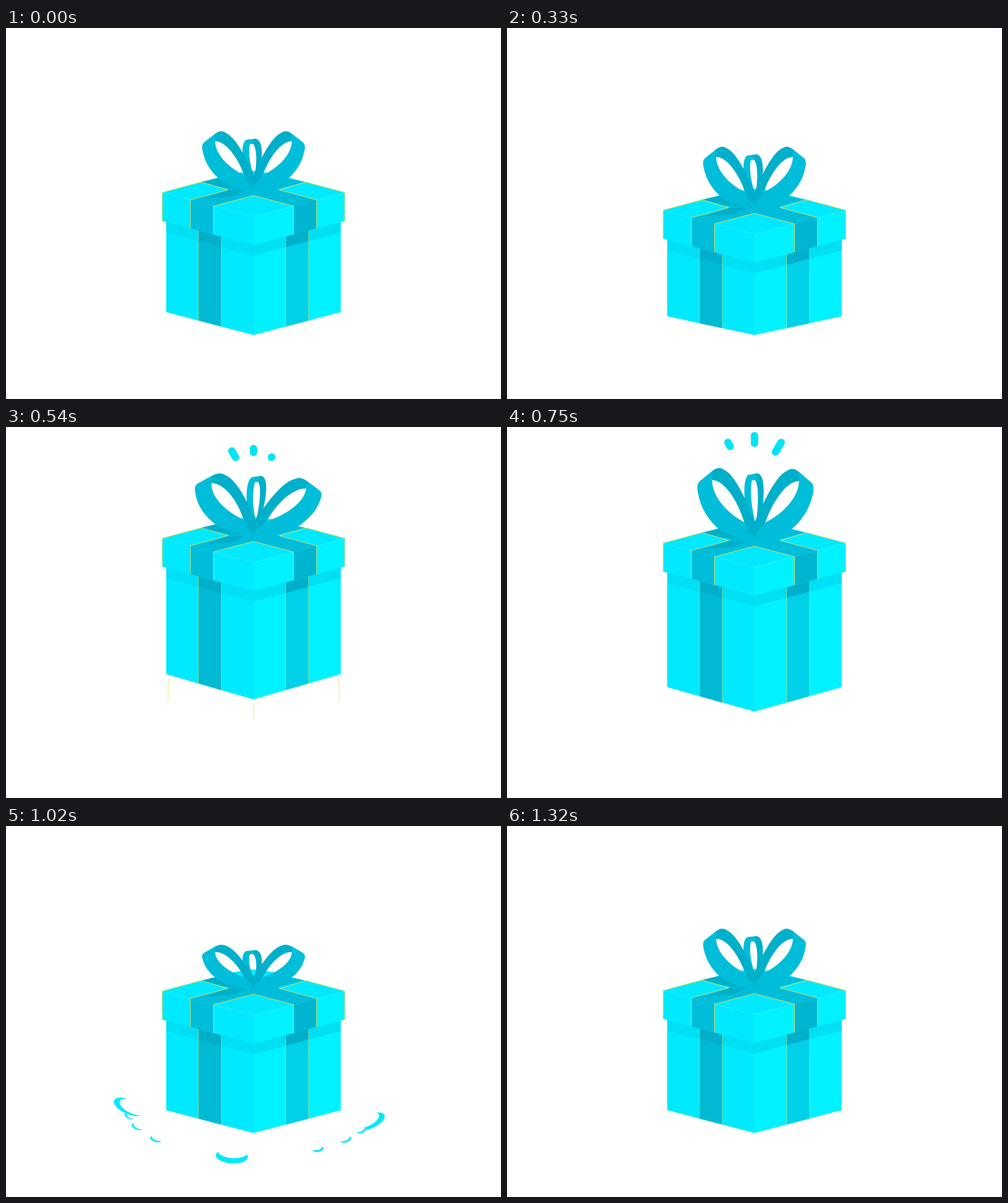
Animation, 800 px wide and 600 px high, one loop 1350 ms. Source, as an HTML page with a canvas:

```html
<!DOCTYPE html>
<html>
<head>
<meta charset="utf-8">
<title>Gift box</title>
<style>
  html, body { margin: 0; width: 100%; height: 100%; overflow: hidden; background: #fff; }
  canvas { display: block; width: 800px; height: 600px; }
</style>
</head>
<body>
<canvas id="stage" width="800" height="600"></canvas>
<script>
const ctx = document.getElementById('stage').getContext('2d');
const { PI, sin, cos, exp, abs, sqrt, sign } = Math;

const LOOP = 1350, STEP = 30;
const TAKEOFF = 379, LANDING = 863;
const GRAVITY = 0.00204;

const C = {
  face: '#00e9ff', bright: '#00f2ff', shade: '#00dff3',
  ribbon: '#00bdd9', ribbonBody: '#00bad4', ribbonLid: '#00b5cf', ribbonRight: '#00d1e8',
  dark: '#00afca', edge: '#dcdc58', dust: '#00e9fa', tick: '#00e4f4', trail: '#fdeebc'
};

const clamp = (v, a = 0, b = 1) => Math.max(a, Math.min(b, v));
const mix = (a, b, u) => a + (b - a) * u;
const smooth = u => u * u * (3 - 2 * u);
const arc = (t, peak, height) => GRAVITY * (t - peak) ** 2 - height;

// Crouch, ballistic flight, then a damped bounce.
function lidOffset(t) {
  if (t < TAKEOFF) return 30 * smooth(t / TAKEOFF);
  if (t < LANDING) return arc(t, 636, 104.8);
  const s = t - LANDING;
  return 51 * exp(-s / 60) * sin(PI * s / 170);
}

function bowPose(t) {
  if (t < TAKEOFF) {
    const tall = 1 + 0.1 * sin(PI * t / TAKEOFF);
    return { wide: 1, tall, mid: tall, sway: 0 };
  }
  if (t < LANDING) {
    const u = (t - TAKEOFF) / (LANDING - TAKEOFF), hump = sin(PI * u);
    const flare = hump * (1 - u / 2), tall = 1 + 0.76 * u ** 3 * hump;
    return { wide: 1 + 0.32 * flare, tall, mid: tall + 0.2 * flare, sway: flare * (1 - u) };
  }
  const s = t - LANDING, tall = 1 - 0.64 * exp(-s / 200) * sin(PI * s / 235);
  return { wide: 1, tall, mid: tall, sway: 0 };
}

function poly(color, ...pts) {
  ctx.fillStyle = color;
  ctx.beginPath();
  for (let i = 0; i < pts.length; i += 2) ctx.lineTo(pts[i], pts[i + 1]);
  ctx.fill();
}

function line(color, width, ...pts) {
  ctx.strokeStyle = color;
  ctx.lineWidth = width;
  ctx.beginPath();
  for (let i = 0; i < pts.length; i += 2) ctx.lineTo(pts[i], pts[i + 1]);
  ctx.stroke();
}

function shape(color, d) {
  ctx.fillStyle = color;
  ctx.fill(new Path2D(d));
}

function oval(color, x, y, rx, ry, rot) {
  ctx.fillStyle = color;
  ctx.beginPath();
  ctx.ellipse(x, y, rx, ry, rot, 0, 2 * PI);
  ctx.fill();
}

// Draws the left half, then its mirror image.
function mirrored(draw) {
  for (const side of [1, -1]) {
    ctx.save();
    ctx.translate(400, 0);
    ctx.scale(side, 1);
    ctx.translate(-400, 0);
    draw(side === 1);
    ctx.restore();
  }
}

function body(t, lid) {
  const lift = Math.max(0, -arc(t, 622, 69.6));
  const front = 496.5 - lift;
  const drop = 37 - 0.24 * Math.max(0, lid) + 0.07 * lift;
  const top = x => 351 + lid - (400 - x) * 0.2635;
  const low = x => front - (400 - x) / 141 * drop;
  const wall = (color, a, b) => poly(color, a, top(a) - 6, b, top(b) - 6, b, low(b), a, low(a));
  const shadow = (color, a, b) => poly(color, a, top(a) - 6, b, top(b) - 6, b, top(b) + 17, a, top(a) + 17);
  mirrored(left => {
    wall(left ? C.face : C.bright, 259, 400);
    shadow(C.shade, 259, 400);
    wall(left ? C.ribbonBody : C.ribbonRight, 311, 348);
    shadow(C.dark, 311, 348);
    ctx.globalAlpha = 0.6;
    for (const x of [311, 348]) line(C.edge, 1, x, top(x), x, low(x));
    ctx.globalAlpha = 1;
  });
}

function lidBox() {
  poly(C.face, 252, 266, 370, 235, 400, 231, 430, 235, 548, 266, 400, 305);
  mirrored(left => poly(left ? C.face : C.bright, 252, 266, 400, 305, 400, 351, 252, 312));
  mirrored(left => {
    poly(C.ribbon, 298, 278, 440, 240, 483, 249, 335, 288);
    poly(left ? C.ribbon : C.ribbonLid, 298, 278, 335, 288, 335, 334, 298, 324);
  });
  poly(C.dark, 315, 249, 366, 237, 392, 250, 388, 262, 350, 258);
  poly(C.dark, 324, 275, 358, 262, 388, 262, 364, 273);
  mirrored(() => {
    line(C.edge, 1, 298, 324, 298, 278, 358, 262, 315, 249, 252.5, 266, 252.5, 312);
    line(C.edge, 1, 335.5, 334, 335.5, 288, 400, 271);
  });
}

function sideLoop() {
  shape(C.dark, 'M336 173C343 166 350 166 354 169C370 175 386 206 402 242L402 262L385 238C374 208 355 183 338 183Z');
  shape(C.ribbon, 'M338 171L320 185Q315 189 318 200C322 220 334 237 352 250L400 268L400 256L385 238C356 224 338 202 338 183Z');
}

function middleLoop() {
  shape(C.dark, 'M388 181L403 179C418 181 415 218 407 246L401 246C405 225 407 196 399 187L393 188Z');
  shape(C.ribbon, 'M388 181C379 187 380 218 395 246L403 246C394 222 391 202 394 188Q396 186 399 188L401 180Z');
}

function bow({ wide, tall, mid, sway }) {
  const place = (w, h, tilt, flip, draw) => {
    ctx.save();
    ctx.translate(400, 262);
    ctx.transform(w, tilt, -0.23 * sway, h, 0, 0);
    ctx.scale(flip, 1);
    ctx.translate(-400, -262);
    draw();
    ctx.restore();
  };
  place(1, mid, 0, 1, middleLoop);
  for (const flip of [1, -1]) place(wide, tall, 0.15 * sway, flip, sideLoop);
  poly(C.dark, 386, 246, 402, 240, 404, 250, 400, 255);
}

// A ring of puffs bursts out along the floor, each eaten away from the inside.
function dust(t) {
  if (t < 840 || t >= 1110) return;
  const u = (t - 870) / 150, grow = clamp((t - 810) / 60);
  const spread = u < 0 ? u : 1 - (1 - clamp(u)) ** 1.5;
  const bite = clamp(0.92 * u, 0, 1.1);
  for (let i = -4; i <= 4; i++) {
    const a = PI * (0.55 + 0.47 * sign(i) * sqrt(abs(i) / 4)), big = i % 4 === 0;
    const x = 396 + mix(157, 198, spread) * cos(a);
    const y = mix(468, 459, spread) + mix(36, 76, spread) * sin(a);
    const rx = mix(24, big ? 26 : 9, spread) * grow;
    const ry = mix(7, big ? 11.5 : 4.5, spread) * grow;
    const rot = -0.42 * cos(a);
    oval(C.dust, x, y, rx, ry, rot);
    if (!bite) continue;
    const off = 0.65 * ry * clamp((1.6 - u) / 0.6);
    oval('#fff', x - cos(a) * off, y - sin(a) * off, rx * bite, ry * bite, rot);
  }
}

function ticks(t) {
  ctx.lineCap = 'round';
  for (const i of [-1, 0, 1]) {
    const head = clamp((t - 520 - 18 * i) / 90), tail = clamp((t - 652 - 34 * i) / 180);
    if (head <= 0 || tail >= 1) continue;
    const at = u => [400 + i * mix(29, 43, u), mix(41, 14, u) + abs(i) * mix(8, 11, u)];
    line(C.tick, 12, ...at(tail), ...at(head));
  }
  ctx.lineCap = 'butt';
}

function trails(t) {
  if (t < 510 || t > 570) return;
  for (const i of [-1, 0, 1]) {
    const y = 448 - 41 * abs(i);
    line(C.trail, 2, 400.5 + 137 * i, y, 400.5 + 139 * i, y + 26 + 12 * abs(i));
  }
}

function draw(t) {
  const lid = lidOffset(t);
  ctx.fillStyle = '#fff';
  ctx.fillRect(0, 0, 800, 600);
  dust(t);
  trails(t);
  body(t, lid);
  ctx.save();
  ctx.translate(0, lid);
  lidBox();
  bow(bowPose(t));
  ctx.restore();
  ticks(t);
}

const start = performance.now();
function tick() {
  const t = (performance.now() - start) % LOOP;
  draw(Math.floor(t / STEP) * STEP);
  requestAnimationFrame(tick);
}
tick();
</script>
</body>
</html>
```
